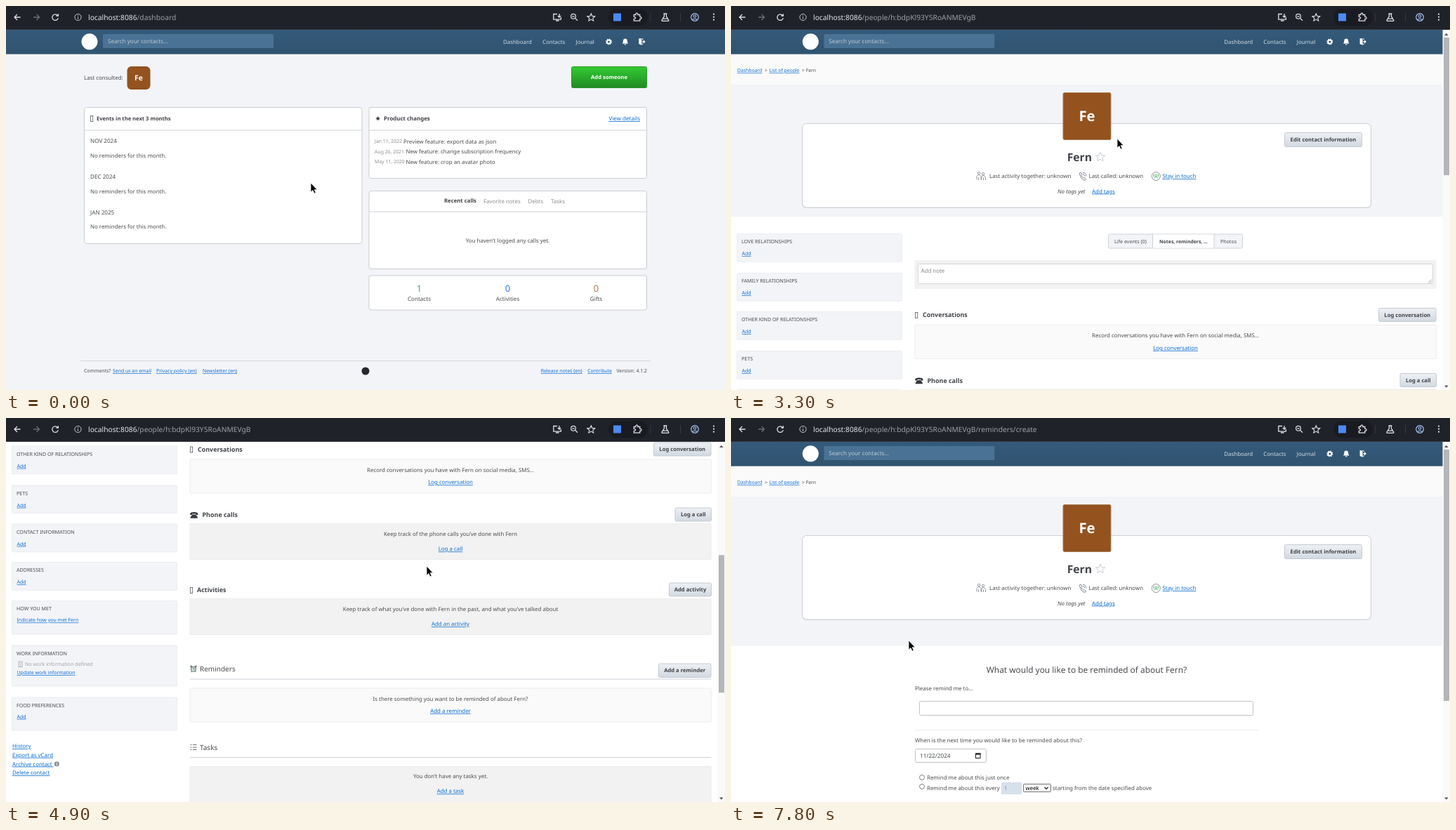
Write an HTML page that moves like this. It is 1024x547 px and loops after 8000 ms.

```html
<!DOCTYPE html>
<html lang="en">
<head>
<meta charset="utf-8">
<title>Contact reminder walkthrough</title>
<style>
html, body { margin: 0; width: 100%; height: 100%; overflow: hidden; background: #f3f4f8; }
svg { display: block; width: 100vw; height: 100vh; }
text { font-family: "Noto Sans", "Open Sans", sans-serif; fill: #4a4c50; text-rendering: geometricPrecision; white-space: pre; }
.b { font-weight: 700; fill: #404348; }
.i { font-style: italic; }
.l { fill: #0b6cd4; text-decoration: underline; text-decoration-thickness: .7px; }
.m { text-anchor: middle; }
.e { text-anchor: end; }
.g { fill: #8b8d91; }
.w { fill: #fff; }
.nav { fill: #d0dbe4; }
.o { fill: none; stroke: #dfe1e5; stroke-width: 1.3; }
</style>
</head>
<body>
<svg id="stage" viewBox="0 0 1024 547" preserveAspectRatio="none"></svg>
<script>
const NAME = 'Fern', INITIALS = 'Fe', BODY = 7.9, BOLD = 7.67;
const HOST = 'localhost:8086', PERSON = '/people/h:bdpKl93Y5RoANMEVgB', CREATE = PERSON + '/reminders/create';

// y is the visual middle of the line
const text = (x, y, str, cls = '', size = BODY, extra = '') =>
  `<text x="${x}" y="${y + .36 * size - .3}" font-size="${size}" class="${cls}" ${extra}>${str}</text>`;
const rect = (x, y, x2, y2, fill, extra = '') =>
  `<rect x="${x}" y="${y}" width="${x2 - x}" height="${y2 - y}" fill="${fill}" ${extra}/>`;
const box = (x, y, x2, y2, fill, stroke, r = 2) =>
  rect(x + .5, y + .5, x2 - .5, y2 - .5, fill, `stroke="${stroke}" rx="${r}"`);
const circle = (x, y, r, fill, extra = '') => `<circle cx="${x}" cy="${y}" r="${r}" fill="${fill}" ${extra}/>`;
const path = (d, extra = 'class="o"') => `<path d="${d}" ${extra}/>`;
const group = (id, body, extra = '') => `<g id="${id}" ${extra}>${body}</g>`;
const glyphBox = (x, y) => rect(x + .5, y - 4, x + 3.7, y + 4, 'none', 'stroke="#5b5d60" stroke-width=".8"');
const button = (x, y, x2, y2, label) =>
  box(x, y, x2, y2, 'url(#grey)', '#c4cad2') + text((x + x2) / 2, (y + y2) / 2 + .2, label, 'b m', BOLD);

const header = dx => rect(0, 34, 1024, 68.6, 'url(#head)') + `<g transform="translate(${dx} 0)">`
  + circle(119, 50.8, 11.5, '#fff')
  + rect(138, 40, 381, 60, '#4a7294', 'rx="1.5"')
  + text(145, 50.8, 'Search your contacts…', '', 8.1, 'style="fill:#bccbd8"')
  + text(708, 51.7, 'Dashboard', 'nav') + text(764, 51.7, 'Contacts', 'nav') + text(811.5, 51.7, 'Journal', 'nav')
  + circle(858.5, 51, 2.5, 'none', 'stroke="#fff" stroke-width="2"')
  + circle(858.5, 51, 3.9, 'none', 'stroke="#fff" stroke-width="1.2" stroke-dasharray="1.6 1.46"')
  + path('M877.5 53.5q1.5-1 1.5-4a2.9 2.9 0 0 1 5.8 0q0 3 1.5 4zM880.6 54.3h2.6a1.3 1.3 0 0 1-2.6 0z', 'fill="#fff"')
  + path('M901.3 46.3l4 1.4v8l-4-1.6zM906.3 49.9h1.6v-1.7l2.7 2.6-2.7 2.6v-1.7h-1.6z', 'fill="#fff"')
  + path('M901.5 46.6h5.3v2M906.8 53v1.7h-1.6', 'fill="none" stroke="#fff" stroke-width=".8"') + '</g>';

const monthBlock = (name, y) => text(120, y, name, '', 8.1) + text(120, y + 20.8, 'No reminders for this month.');
const change = (y, date, x, note) => text(525, y, date, 'g', 6.9) + text(x, y, note);
const counter = (x, n, color, label) =>
  text(x, 402.5, n, 'm', 13, `style="fill:${color}"`) + text(x, 417.5, label, 'm', 8.05);

const home = rect(0, 34, 1024, 547, '#f3f4f8') + header(0)
  + text(111, 102, 'Last consulted:')
  + rect(172.5, 86, 205.5, 119, '#93521e', 'rx="6"') + text(189, 102.5, INITIALS, 'b w m', 10.4)
  + box(805, 86, 913, 117, 'url(#green)', '#2a942a') + text(859, 101.5, 'Add someone', 'b w m', BOLD)
  + box(111, 144, 507.5, 339, '#fff', '#c9cdd2', 3) + rect(111, 176.5, 507, 177.5, '#cdd1d6')
  + glyphBox(120, 160.5) + text(129, 160.5, 'Events in the next 3 months', 'b', 7.6)
  + monthBlock('NOV 2024', 192.5) + monthBlock('DEC 2024', 243.5) + monthBlock('JAN 2025', 294)
  + box(516.5, 144, 913, 246, '#fff', '#c9cdd2', 3) + rect(517, 176.5, 912.5, 177.5, '#cdd1d6')
  + path('M526.7 160.3h6M529.7 157.3v6M527.6 158.2l4.2 4.2M531.8 158.2l-4.2 4.2', 'stroke="#36393e" stroke-width=".8"')
  + circle(529.7, 160.3, 1.7, '#36393e')
  + text(538, 160.5, 'Product changes', 'b') + text(903, 160.5, 'View details', 'l e', 8.05)
  + change(193, 'Jan 11, 2022', 566, 'Preview feature: export data as json')
  + change(207.5, 'Aug 26, 2021', 569.5, 'New feature: change subscription frequency')
  + change(222, 'May 11, 2020', 569.5, 'New feature: crop an avatar photo')
  + box(516.5, 263, 913, 375, '#fff', '#c9cdd2', 3) + rect(517, 292.5, 912.5, 293.5, '#cdd1d6')
  + text(624, 278, 'Recent calls', 'b', 7.75) + text(680, 278, 'Favorite notes', 'g')
  + text(743.5, 278, 'Debts', 'g') + text(776, 278, 'Tasks', 'g')
  + text(714.5, 334, 'You haven’t logged any calls yet.', 'm')
  + box(516.5, 383.5, 913, 433.5, '#fff', '#c9cdd2', 3)
  + counter(588.5, 1, '#3fa387', 'Contacts') + counter(714.5, 0, '#3d82da', 'Activities')
  + counter(840.5, 0, '#b9764a', 'Gifts')
  + rect(106, 505, 918, 506, '#d3d6da')
  + text(111, 520, 'Comments?', '', 6.9) + text(152, 520, 'Send us an email', 'l', 6.9)
  + text(214, 520, 'Privacy policy (en)', 'l', 6.9) + text(280, 520, 'Newsletter (en)', 'l', 6.9)
  + circle(512, 520, 5.5, '#25282c')
  + text(820.5, 520, 'Release notes (en)', 'l e', 6.9) + text(863, 520, 'Contribute', 'l e', 6.9)
  + text(913, 520, 'Version: 4.1.2', 'e', 6.9);

const profile = heroEnd => rect(0, 34, 1014, 1400, '#fff') + rect(0, 68, 1014, 112, '#fafafa')
  + rect(0, 112, 1014, heroEnd, '#f3f4f8') + header(-5.7)
  + text(9, 92, 'Dashboard', 'l', 6.8) + text(48, 92, '&gt;', '', 6.8) + text(54.5, 92, 'List of people', 'l', 6.8)
  + text(101, 92, '&gt; ' + NAME, '', 6.8)
  + rect(101, 168, 912, 288, '#dcdee3', 'rx="6"') + box(101, 167, 912, 287.5, '#fff', '#cdd0d5', 6)
  + box(472.5, 123, 541.5, 191, '#93521e', '#a9805e', 2) + text(507, 157.3, INITIALS, 'b w m', 20.4)
  + button(788, 180, 899, 201, 'Edit contact information')
  + text(514, 215.7, NAME, 'b e', 15.7)
  + path('M526 208.2l1.9 4.4 4.7.4-3.6 3.1 1.1 4.6-4.1-2.5-4.1 2.5 1.1-4.6-3.6-3.1 4.7-.4z', 'fill="none" stroke="#c9ccd0"')
  + circle(353.2, 238, 1.7, 'none', 'stroke="#7c828a" stroke-width=".8"') + circle(359, 239, 1.7, 'none', 'stroke="#7c828a" stroke-width=".8"')
  + path('M350 247.5v-5q3-4 6 0v5M352.5 248v-4M356.5 248v-4.5q3-4 6 0v4.5M359.5 248v-3.5', 'fill="none" stroke="#7c828a" stroke-width=".8"')
  + text(368, 242.5, 'Last activity together: unknown')
  + path('M496.3 238l2-1 1.8 3-1.2 1.2q.8 2.6 3 4.2l1.5-.8 2.4 2.2-1.5 1.5q-6 0-8-10.3zM501 237q4.5.5 5 5.5M501 239.5q2.5.5 3 3', 'fill="none" stroke="#707a88" stroke-width=".9"')
  + text(509.5, 242.5, 'Last called: unknown')
  + circle(605.3, 242.5, 6, '#fff', 'stroke="#848b92" stroke-width=".9"')
  + path('M605.3 241.5l-2 4M605.3 241.5l2 4M602.2 239.5v3.4M608.4 239.5v3.4M604 240h2.6', 'stroke="#3cae55" fill="none"')
  + text(614.5, 242.5, 'Stay in touch', 'l')
  + text(465, 264, 'No tags yet', 'i') + text(514, 264, 'Add tags', 'l');

const side = (y, y2, title) => box(8, y, 244, y2, '#f3f4f8', '#ebedf1', 1) + text(15, y + 12, title, '', 7.1);
const sideAdd = (y, title) => side(y, y + 40.7, title) + text(15.5, y + 29, 'Add', 'l', 7);
const panel = (y, y2, fill, line, link, ly, ty) => box(261.5, y, 1004.7, y2, fill, '#ececec', 1)
  + text(633, ty, line, 'm') + text(633, ly, link, 'l m');
const section = (x, y, title) => text(x, y, title, 'b', 8.95);
const ruled = (y, line, title) => text(276, y, title, '', 10) + rect(262, line, 1004.5, line + 1, '#ced2d7');

const person = profile(300)
  + [[324, 'LOVE RELATIONSHIPS'], [380, 'FAMILY RELATIONSHIPS'], [435, 'OTHER KIND OF RELATIONSHIPS'],
     [491, 'PETS'], [546, 'CONTACT INFORMATION'], [600.5, 'ADDRESSES']].map(a => sideAdd(...a)).join('')
  + side(655.5, 704, 'HOW YOU MET') + text(15.5, 683.7, `Indicate how you met ${NAME}`, 'l', 7)
  + side(719, 778, 'WORK INFORMATION')
  + rect(18, 742.5, 23, 750, 'none', 'stroke="#a4a7ab" stroke-width=".8"') + path('M19.5 744.5h2M19.5 746.5h2M19.5 748.5h2', 'stroke="#a4a7ab" stroke-width=".8"')
  + text(27, 746.5, 'No work information defined', '', 7.1, 'style="fill:#a2a5a9"') + text(15.5, 758.3, 'Update work information', 'l', 7)
  + side(793, 841, 'FOOD PREFERENCES') + text(15.5, 821, 'Add', 'l', 7)
  + text(9, 863, 'History', 'l') + text(9, 875.7, 'Export as vCard', 'l') + text(9, 888.5, 'Archive contact ', 'l')
  + circle(72.3, 888.3, 3.5, '#8c9095') + rect(71.8, 887.5, 72.8, 890.5, '#fff') + rect(71.8, 885.8, 72.8, 886.7, '#fff')
  + text(9, 901, 'Delete contact', 'l')
  + box(537, 324.5, 729, 345.5, '#f3f4f8', '#cfd3d8') + rect(600.5, 325.5, 688, 344.5, '#fff')
  + rect(600, 325, 601, 345, '#cfd3d8') + rect(687.5, 325, 688.5, 345, '#cfd3d8')
  + text(569, 335.5, 'Life events (0)', 'm', 7.1) + text(644.5, 335.5, 'Notes, reminders, ...', 'b m', 6.86) + text(708.5, 335.5, 'Photos', 'm', 7.05)
  + rect(261.5, 362, 1004.5, 403, '#f2f2f2') + box(266, 367, 1000, 396, '#fff', '#d4d6d9', 1)
  + text(270.5, 377, 'Add note', '', BODY, 'style="fill:#818489"') + path('M993 394.5l5-5M996 394.5l2-2', 'stroke="#808080" stroke-width=".8"')
  + glyphBox(262, 440.5) + section(273, 440.3, 'Conversations') + button(922, 430, 1004.5, 450, 'Log conversation')
  + panel(454, 503, '#fafafa', `Record conversations you have with ${NAME} on social media, SMS…`, 'Log conversation', 487.3, 469.8)
  + path('M262 532.5q0-3 5.8-3t5.8 3l-.4 1h-2.3l-.8-1.6h-4.6l-.8 1.6h-2.3zM265.5 533h4.6l2.7 3.5v1.7h-10v-1.7z', 'fill="#36393e"')
  + section(279.5, 533.7, 'Phone calls') + button(952.5, 523, 1005, 543, 'Log a call')
  + panel(545.5, 597.5, '#f2f2f2', `Keep track of the phone calls you’ve done with ${NAME}`, 'Log a call', 582.3, 560.5)
  + glyphBox(262, 641) + section(272, 640.7, 'Activities') + button(944, 630, 1005, 650, 'Add activity')
  + panel(652.5, 704.5, '#f2f2f2', `Keep track of what you’ve done with ${NAME} in the past, and what you’ve talked about`, 'Add an activity', 689.3, 667.5)
  + circle(267, 753.3, 3.5, '#cfe0d9', 'stroke="#6b7c78" stroke-width="1.1"') + circle(263.7, 749.5, 1.4, '#6b7c78') + circle(270.3, 749.5, 1.4, '#6b7c78')
  + path('M267 751v2.3h1.7M264.4 756l-1 1.6M269.6 756l1 1.6', 'fill="none" stroke="#56635f" stroke-width=".8"')
  + ruled(753.3, 767, 'Reminders') + button(929, 745, 1004.5, 765.5, 'Add a reminder')
  + panel(780, 829, '#fafafa', `Is there something you want to be reminded of about ${NAME}?`, 'Add a reminder', 812.8, 796)
  + path('M262.5 861h2M262.5 864.5h2M262.5 868h2M266 861h5.5M266 864.5h5.5M266 868h5.5', 'stroke="#6d7278" stroke-width="1.1"')
  + ruled(864.7, 878.5, 'Tasks')
  + panel(891.5, 950.5, '#f2f2f2', 'You don’t have any tasks yet.', 'Add a task', 927.3, 906)
  + rect(262.3, 983, 271.5, 985.5, '#63676c') + rect(263, 986.2, 271, 990.5, '#63676c') + rect(266.4, 982, 267.4, 990.5, '#fff')
  + path('M267 983q-4-.5-3-3t3 3q0-5 3-3t-3 3', 'fill="none" stroke="#63676c" stroke-width=".9"')
  + ruled(986, 1000, 'Gifts') + button(951, 978, 1004.5, 998.5, 'Add a gift')
  + text(262, 1019.3, 'Gift ideas (0)', 'b', 7.84) + text(321, 1019.3, 'Gifts given (0)', 'g') + text(383.5, 1019.3, 'Gifts received (0)', 'g')
  + rect(262, 1067, 272, 1072.5, '#3f9a4e') + circle(267, 1069.8, 1.7, '#a5d6ab')
  + ruled(1070, 1084, 'Debts') + button(953.5, 1061, 1004.5, 1081.5, 'Add debt');

const form = profile(324.5)
  + text(506.5, 359, `What would you like to be reminded of about ${NAME}?`, 'm', 11.9)
  + text(262, 385.8, 'Please remind me to…') + box(268, 403, 744, 424, '#fff', '#bfc2c6')
  + rect(262, 444, 752, 445, '#ebecee')
  + text(262, 459.8, 'When is the next time you would like to be reminded about this?')
  + box(262, 471, 364, 491, '#fff', '#bfc2c6') + text(269, 481, '11/22/2024', '', 8.2)
  + rect(348.5, 478, 355, 484.5, 'none', 'stroke="#222"') + rect(348, 477.5, 355.5, 479.7, '#222')
  + circle(272, 512, 3.5, '#fff', 'stroke="#777" stroke-width=".9"') + circle(272, 525, 3.5, '#fff', 'stroke="#777" stroke-width=".9"')
  + text(279, 512.2, 'Remind me about this just once') + text(279, 527.7, 'Remind me about this every')
  + rect(385, 519, 414, 536, '#d7e1eb', 'rx="1"') + text(389, 527.7, '1', 'g')
  + box(416, 521, 456, 533, '#fff', '#6f6f6f', 1) + text(419.5, 527.5, 'week', '', BODY, 'style="fill:#000"')
  + path('M446.5 526l2.5 2.5 2.5-2.5', 'fill="none" stroke="#111" stroke-width="1.2"')
  + text(458, 527.7, 'starting from the date specified above');

const scrollbar = rect(1013.5, 34, 1024, 547, '#fafafa')
  + path('M1016 42l2.8-3.2 2.8 3.2zM1016 540.5l2.8 3.2 2.8-3.2z', 'fill="#55575a"')
  + '<rect id="thumb" x="1015" width="8" fill="#b4b6b9"/>';

const toolbar = rect(0, 0, 1024, 34, '#20222a') + rect(0, 33, 1024, 34, '#383b42')
  + path('M20.5 16h-8M16 12l-4 4 4 4')
  + path('M39 16h8M43.5 12l4 4-4 4', 'class="o" style="stroke:#6b6e75"')
  + group('reload', path('M73.6 13.6a4.3 4.3 0 1 0 .7 3.6M74.4 11.2v3h-3'))
  + group('stop', path('M66 12l8 8M74 12l-8 8'))
  + circle(102.5, 16, 4.6, 'none', 'stroke="#c4c7cc"') + rect(102, 15.5, 103, 18.7, '#c4c7cc') + rect(102, 13.2, 103, 14.3, '#c4c7cc')
  + `<text x="117" y="19.5" font-size="10.25" style="fill:#e6e7ea">${HOST}<tspan id="route" fill="#9da1a9"></tspan></text>`
  + path('M785 11.5h-5.2v7.6h10.6v-3M783 21h4.5M788 11v5M785.8 14l2.2 2.2 2.2-2.2', 'class="o" stroke-width="1.1"')
  + circle(808, 14.8, 3.4, 'none', 'stroke="#dfe1e5" stroke-width="1.2"') + path('M810.6 17.4l3.4 3.4M806.3 14.8h3.4')
  + path('M833.3 10.8l1.6 3.6 3.9.3-3 2.6.9 3.8-3.4-2-3.4 2 .9-3.8-3-2.6 3.9-.3z', 'fill="none" stroke="#dfe1e5" stroke-width="1.1"')
  + rect(858, 4, 914, 28, '#191b21', 'rx="12"')
  + rect(865, 10.5, 876, 21.5, '#4a8af4')
  + path('M894.3 12.5h2.6q-.3-2.3 1.5-2.3t1.5 2.3h2.9v2.9q2.2-.2 2.2 1.5t-2.2 1.5v2.8h-8.5v-2.8q2.2.1 2.2-1.5t-2.2-1.5z')
  + path('M936.4 11h5M937.4 11v3.8l-3.4 5.4q-.3 1.2 1 1.2h7.8q1.3 0 1-1.2l-3.4-5.4v-3.8M935.6 18.2h6.6')
  + rect(917.5, 10, 918.3, 22, '#3d414b') + rect(960, 10, 960.8, 22, '#3d414b')
  + circle(981, 16, 5.3, 'none', 'stroke="#a8c7fa" stroke-width="1.2"') + circle(981, 14.5, 1.8, 'none', 'stroke="#a8c7fa" stroke-width="1.1"')
  + path('M977.4 19.6q3.6-2.6 7.2 0', 'fill="none" stroke="#a8c7fa" stroke-width="1.1"')
  + [11.7, 15.7, 19.7].map(y => circle(1008, y, 1.1, '#dfe1e5')).join('');

const gradient = (id, a, b) => `<linearGradient id="${id}" x2="0" y2="1"><stop stop-color="${a}"/><stop offset="1" stop-color="${b}"/></linearGradient>`;
const stage = document.getElementById('stage');
stage.innerHTML = `<defs>${gradient('grey', '#eef1f4', '#d2d9e1')}${gradient('green', '#33cb33', '#1f8a22')}${gradient('head', '#345a7b', '#30536f')}</defs>`
  + group('home', home) + group('person', person) + group('form', form) + group('scroll', scrollbar) + toolbar
  + group('tip', rect(174, 125, 203, 145, '#050505', 'rx="2.5"') + text(188.5, 135.3, NAME, 'w m', 8))
  + group('status', '<path id="bar" fill="#1f2128" stroke="#33363e" stroke-width=".8"/><text id="link" x="3" y="542" style="fill:#e3e5e9"></text>')
  + group('cursor', group('arrow', path('M0 0v13.2l3-2.7 2 4.6 2.2-1-2-4.4h4z', 'fill="#000" stroke="#fff" stroke-width=".8"'))
    + group('hand', path('M-1.3 7.3V1.2q0-1 1-1t1 1V4.3l4.8.9q1.4.3 1.4 1.7 0 2.5-1.2 4.2v2H-.3v-1.6L-4 8.2q-.7-1 .2-1.6t2.5.7z', 'fill="#000" stroke="#fff" stroke-width=".9"')));

const el = {};
stage.querySelectorAll('[id]').forEach(n => el[n.id] = n);
const show = (id, on) => el[id].style.display = on ? '' : 'none';

// keys are [time, ...values], linear in between
function track(keys, t) {
  const i = keys.findIndex(k => k[0] > t);
  if (i < 0) return keys[keys.length - 1].slice(1);
  if (!i) return keys[0].slice(1);
  const [a, b] = [keys[i - 1], keys[i]], p = (t - a[0]) / (b[0] - a[0]);
  return a.slice(1).map((v, j) => v + (b[j + 1] - v) * p);
}
const pointer = [[800, 434, 252], [1300, 195, 105], [2800, 195, 105], [3300, 550, 189], [3600, 598, 210.5],
  [3700, 599, 211], [5700, 599, 211], [6000, 611, 242], [7500, 611, 242], [7800, 253, 317]];
const scrolling = [[3800, 0], [4100, 147], [4500, 346], [4600, 370], [4800, 370], [4900, 395.5],
  [5100, 444], [5300, 444], [5400, 470], [5600, 543], [5700, 567]];
const statusFade = [[1500, 0], [1700, 1], [2700, 1], [2900, 0], [6000, 0], [6200, 1], [7200, 1], [7400, 0]];

function draw(t) {
  const page = t < 2800 ? 'home' : t < 7000 ? 'person' : 'form';
  for (const id of ['home', 'person', 'form']) show(id, id === page);
  show('scroll', page !== 'home');
  const top = page === 'person' ? track(scrolling, t)[0] : 0;
  el.person.setAttribute('transform', `translate(0 ${-top})`);
  el.thumb.setAttribute('y', 45 + top * .38);
  el.thumb.setAttribute('height', page === 'form' ? 358 : 196);
  el.route.textContent = { home: '/dashboard', person: PERSON, form: CREATE }[page];

  const loading = t >= 2600 && t < 2900 || t >= 6900 && t < 7100;
  show('stop', loading);
  show('reload', !loading);

  const late = t > 4000, width = late ? 340 : 256;
  el.status.setAttribute('opacity', track(statusFade, t)[0]);
  el.bar.setAttribute('d', `M-1 529.5H${width - 3.5}q3 0 3 3V548H-1z`);
  el.link.setAttribute('font-size', late ? 10.7 : 10.9);
  el.link.textContent = late ? HOST + CREATE : t < 2600 ? HOST + PERSON : 'Waiting for localhost...';

  show('tip', t >= 1400 && t < 2800);
  const hand = t >= 1300 && t < 2800 || t >= 5900 && t < 7000;
  show('hand', hand);
  show('arrow', !hand);
  el.cursor.setAttribute('transform', `translate(${track(pointer, t)})`);
}

// the picture advances ten times a second
function tick() {
  draw(Math.floor(performance.now() % 8000 / 100) * 100);
  requestAnimationFrame(tick);
}
tick();
</script>
</body>
</html>
```
